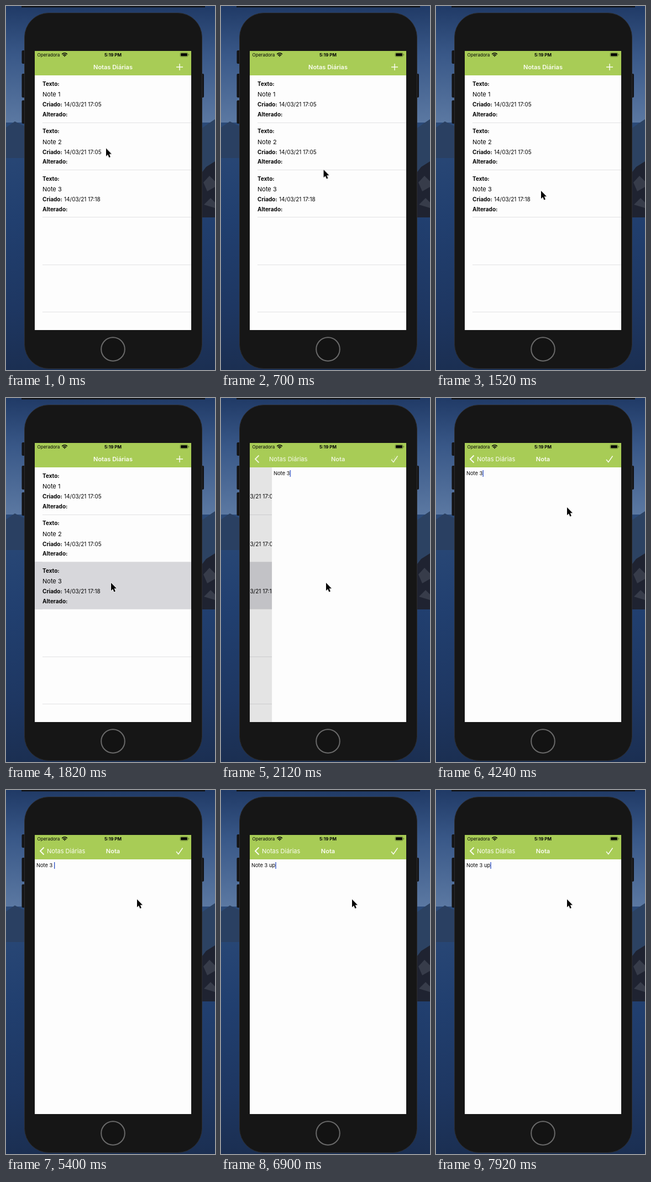
Recreate the animation shown at these times as an HTML page. Size 378 by 656 pixels, loop 8000 ms.

```html
<!DOCTYPE html>
<html lang="pt">
<head>
<meta charset="utf-8">
<title>Notas</title>
<style>
html, body { margin: 0; width: 100%; height: 100%; overflow: hidden; background: #1c3358; }
svg { display: block; width: 378px; height: 656px; }
text { font: 10px Inter, "Open Sans", sans-serif; fill: #050505; white-space: pre; }
.bold { font-weight: 700; }
.note { font-size: 11px; }
.status { font-size: 8.1px; }
.edit { font-size: 9.3px; }
.nav text { font-size: 11px; fill: #fcfdf4; }
.nav .title { font-weight: 600; text-anchor: middle; }
.icon { fill: none; stroke: #fcfdf4; stroke-width: 1.4; }

/* Screen transition: every part goes from its list state to its editor state */
.push {
  --x0: 0px; --x1: 0px; --o0: 1; --o1: 1;
  animation: push 8s infinite;
}
@keyframes push {
  0%, 23.5% {
    transform: translateX(var(--x0)); opacity: var(--o0);
    animation-timing-function: cubic-bezier(.33, 1, .68, 1);
  }
  29.75%, 100% { transform: translateX(var(--x1)); opacity: var(--o1); }
}
.in { --o0: 0; }
.out { --o1: 0; }

.tapped { animation: tap 8s step-end infinite; }
@keyframes tap { 0% { opacity: 0; } 22.25% { opacity: 1; } }

.pointer { animation: pointer 8s ease-in-out infinite; }
@keyframes pointer {
  0%, 3.75% { transform: translate(181px, 256.5px); }
  13.75%, 30.625% { transform: translate(190px, 333px); }
  36.875%, 100% { transform: translate(237px, 197px); }
}

/* Typing: one state per keystroke, each with its own caret phase */
.typed { animation: 8s step-end infinite; }
@keyframes type0 { 0% { visibility: visible; } 63.75% { visibility: hidden; } }
@keyframes type1 { 0% { visibility: hidden; } 63.75% { visibility: visible; } 81.25% { visibility: hidden; } }
@keyframes type2 { 0% { visibility: hidden; } 81.25% { visibility: visible; } 84% { visibility: hidden; } }
@keyframes type3 { 0% { visibility: hidden; } 84% { visibility: visible; } }
.caret { fill: #2b4fc4; animation: blink 1s infinite; }
@keyframes blink {
  0% { opacity: .15; }
  8%, 50% { opacity: 1; }
  64%, 97% { opacity: 0; }
  100% { opacity: .15; }
}
</style>
</head>
<body>
<svg viewBox="0 0 378 656">
  <defs>
    <linearGradient id="sky" x2="0" y2="1">
      <stop offset="0" stop-color="#203a66"/>
      <stop offset=".4" stop-color="#395888"/>
      <stop offset="1" stop-color="#5e7ba4"/>
    </linearGradient>
    <linearGradient id="lake" x2="0" y2="1">
      <stop offset="0" stop-color="#2b4a78"/>
      <stop offset=".4" stop-color="#213f6f"/>
      <stop offset=".75" stop-color="#1e3762"/>
      <stop offset="1" stop-color="#1b2f52"/>
    </linearGradient>
    <clipPath id="screen"><rect x="52" y="81" width="283" height="503"/></clipPath>
    <g id="labels">
      <text class="bold" x="66" y="143.5">Texto:</text>
      <text class="bold" x="66" y="181">Criado:</text>
      <text class="bold" x="66" y="198.5">Alterado:</text>
    </g>
  </defs>

  <!-- Landscape -->
  <rect width="378" height="220" fill="url(#sky)"/>
  <rect y="210" width="378" height="446" fill="url(#lake)"/>
  <path d="M0 219 16 208 34 217V274H0Z" fill="#2a4062"/>
  <path d="M352 222 366 212 378 204V300H352Z" fill="#2c4262"/>
  <path d="M352 303 362 290 378 280V381H352Z" fill="#1f2331"/>
  <path d="M357 318 368 306 378 316V326L364 334ZM358 358 370 346 378 354V364Z" fill="#373c4a"/>
  <rect x="28" width="332" height="2.5" fill="#121417"/>

  <!-- Phone -->
  <g fill="#141416">
    <rect x="28.5" y="80" width="7" height="24" rx="2"/>
    <rect x="28.5" y="122" width="7" height="43" rx="2"/>
    <rect x="28.5" y="170" width="7" height="42" rx="2"/>
    <rect x="352" y="122" width="6" height="43" rx="2"/>
  </g>
  <rect x="33.5" y="12.5" width="321" height="641" rx="44" fill="#161616" stroke="#2c2c2e"/>
  <circle cx="193.5" cy="618.5" r="21.3" fill="#131313" stroke="#6a6a6a" stroke-width="2"/>

  <g clip-path="url(#screen)">
    <rect x="52" y="81" width="283" height="503" fill="#fdfdfd"/>

    <!-- List -->
    <g class="push" style="--x1:-85px">
      <rect class="tapped" x="52" y="295" width="283" height="86" fill="#d7d7db"/>
      <path d="M66 210.5H335M66 295.5H335M66 380.5H335M66 466.5H335M66 551.5H335" stroke="#e2e2e4"/>
      <use href="#labels"/>
      <use href="#labels" y="85.5"/>
      <use href="#labels" y="171"/>
      <text class="note" x="66" y="163">Note 1</text>
      <text class="note" x="66" y="248.5">Note 2</text>
      <text class="note" x="66" y="334">Note 3</text>
      <text x="105" y="181">14/03/21 17:05</text>
      <text x="105" y="266.5">14/03/21 17:05</text>
      <text x="105" y="352">14/03/21 17:18</text>
      <rect class="push" style="--o0:0;--o1:.115" x="52" y="125" width="283" height="459"/>
    </g>

    <!-- Editor -->
    <g class="push" style="--x0:283px">
      <rect x="52" y="125" width="283" height="459" fill="#fdfdfd"/>
      <g class="typed" style="animation-name:type0">
        <text class="edit" x="55" y="139.3">Note 3</text>
        <rect class="caret" x="84.5" y="130" width="1.3" height="12"/>
      </g>
      <g class="typed" style="animation-name:type1">
        <text class="edit" x="55" y="139.3">Note 3 </text>
        <rect class="caret" style="animation-delay:-.9s" x="87" y="130" width="1.3" height="12"/>
      </g>
      <g class="typed" style="animation-name:type2">
        <text class="edit" x="55" y="139.3">Note 3 u</text>
        <rect class="caret" style="animation-delay:-.5s" x="92.7" y="130" width="1.3" height="12"/>
      </g>
      <g class="typed" style="animation-name:type3">
        <text class="edit" x="55" y="139.3">Note 3 up</text>
        <rect class="caret" style="animation-delay:-.28s" x="98.4" y="130" width="1.3" height="12"/>
      </g>
    </g>

    <!-- Header -->
    <rect x="52" y="81" width="283" height="44" fill="#a8cc56"/>
    <text class="status" x="56.5" y="91">Operadora</text>
    <text class="status bold" x="193.5" y="91" text-anchor="middle">5:19 PM</text>
    <g fill="none" stroke="#050505" stroke-width="1.6">
      <path d="M101.2 86.9Q106 82.6 110.8 86.9M103 89Q106 86.4 109 89"/>
      <path d="M104.3 89.6H107.7L106 91.8Z" fill="#050505" stroke="none"/>
    </g>
    <rect x="314.8" y="84.3" width="14.4" height="7" rx="2" fill="none" stroke="#050505" stroke-width=".7" opacity=".45"/>
    <rect x="316" y="85.3" width="12" height="5" rx="1.2" fill="#050505"/>
    <rect x="330" y="86.6" width="1" height="2.4" rx=".5" fill="#050505" opacity=".5"/>

    <g class="nav">
      <g class="push out" style="--x1:-83px"><text class="title" x="193.5" y="114">Notas Diárias</text></g>
      <g class="push in" style="--x0:92px"><text x="74" y="114">Notas Diárias</text></g>
      <g class="push in" style="--x0:128px"><text class="title" x="193.5" y="114">Nota</text></g>
      <path class="icon push in" d="M68.5 103.5 62 110 68.5 116.5" style="stroke-width:1.9"/>
      <path class="icon push out" d="M308 110H320M314 104V116"/>
      <path class="icon push in" d="M308 111 311.8 115.5 319.5 104.5"/>
    </g>
  </g>

  <path class="pointer" d="M0 0V14.2L3.2 11.3 5.4 16.5 7.9 15.4 5.7 10.3H10Z"
    fill="#050505" stroke="#fdfdfd" stroke-width="1.6" paint-order="stroke" stroke-linejoin="round"/>
</svg>
</body>
</html>
```
